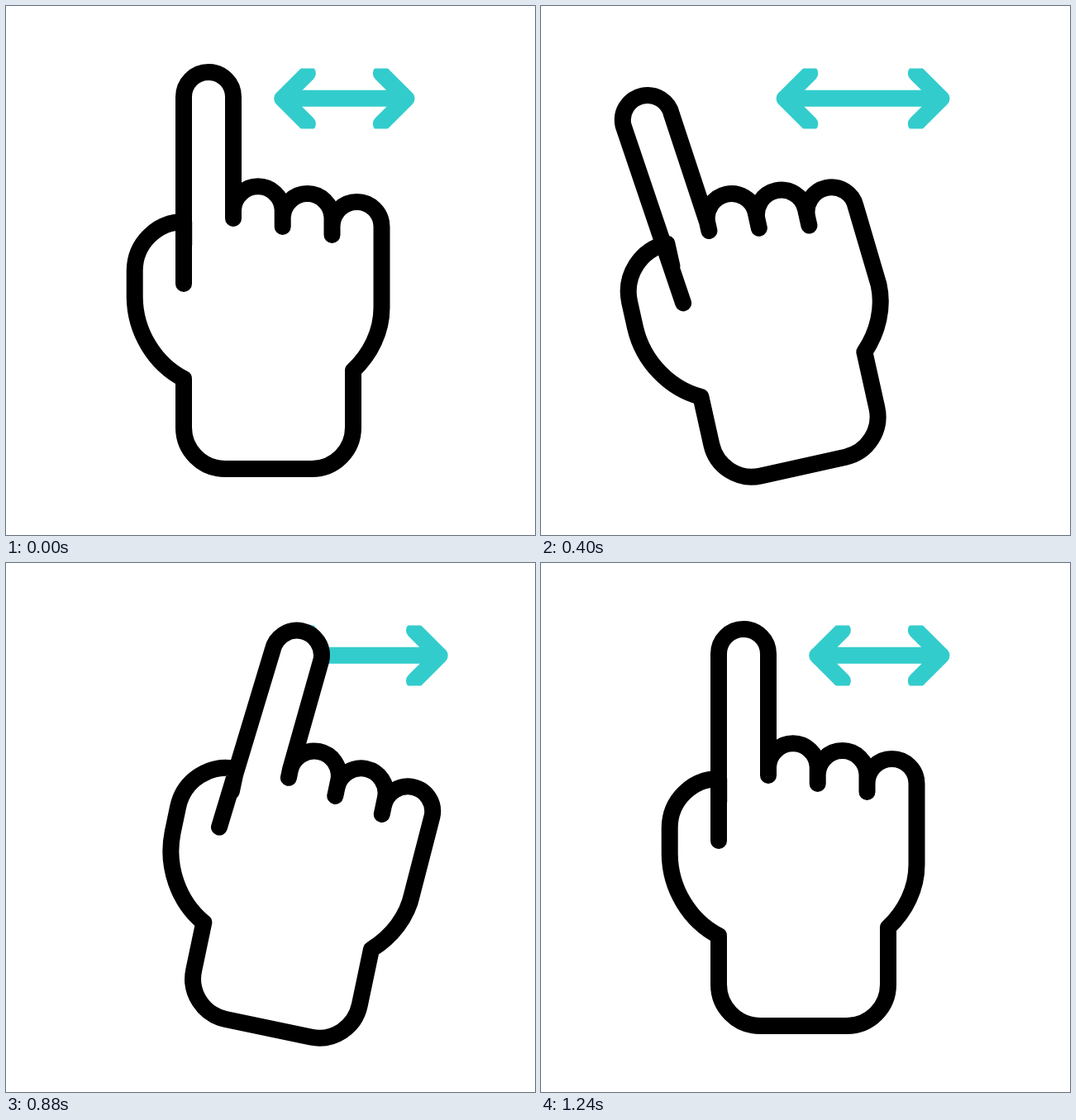
An HTML page that plays this animation: 640x640 px, repeating every 1.48 s.

```html
<!DOCTYPE html>
<html lang="en">
<head>
<meta charset="utf-8">
<title>Swipe gesture</title>
<style>
  html, body { margin: 0; width: 100%; height: 100%; overflow: hidden; background: #fff; }
  svg { display: block; width: 100%; height: 100%; }
  path { stroke-linecap: round; stroke-linejoin: round; }
</style>
</head>
<body>
<svg viewBox="0 0 640 640">
  <clipPath id="band"><rect x="0" y="75.5" width="640" height="73"/></clipPath>
  <path id="arrow" clip-path="url(#band)" fill="none" stroke="#33cccc" stroke-width="20"/>
  <path id="hand" fill="#fff" stroke="#000" stroke-width="20"/>
</svg>
<script>
const STEP = 40, LOOP = 1480;
const hand = document.getElementById('hand');
const arrow = document.getElementById('arrow');

// Each key: step, then values; smooth easing between keys.
// Pose: angle, then x/y offsets of fingertip, knuckles and finger base.
const poseKeys = [
  [2, 0, 0, 0, 0, 0, 0, 0],
  [11, -13, -21, 0, -6.8, 0, 4, -0.5],
  [20, 13, 15, 1.5, 4.8, 1.6, -6, -2],
  [31, 0, 0, 0, 0, 0, 0, 0]
];
const leftKeys = [[2, 0], [11, -41], [20, 0]];
const rightKeys = [[14, 0], [20, 44], [31, 0]];

function track(keys, n) {
  if (n <= keys[0][0]) return keys[0].slice(1);
  for (let i = 1; i < keys.length; i++) {
    const a = keys[i - 1], b = keys[i];
    if (n < b[0]) {
      const x = (n - a[0]) / (b[0] - a[0]);
      const e = x * x * (3 - 2 * x);
      return a.slice(1).map((v, j) => v + (b[j + 1] - v) * e);
    }
  }
  return keys[keys.length - 1].slice(1);
}

function handPath(tx, ty, kx, ky, ex, ey) {
  const tip = (x, y) => `${x + tx} ${y + ty}`;
  const kn = (x, y) => `${x + kx} ${y + ky}`;
  const arc = (r, end) => `A${r} ${r} 0 0 1 ${end}`;
  return [
    `M${215 + ex} ${336 + ey}`,
    `L${tip(215, 110)}`, arc(30, tip(275, 110)),
    `L${kn(275, 246.5)}L${kn(275, 257)}L${kn(275, 246.5)}`,
    arc(29.9, kn(334.7, 246.5)),
    `L${kn(334.7, 267)}L${kn(334.7, 257)}`,
    arc(29.9, kn(394.5, 257)),
    `L${kn(394.5, 277)}L${kn(394.5, 267)}`,
    arc(30, kn(454.5, 267)),
    'L454.5 365C454.5 394 441 421 420 441',
    'V510', arc(50, '370 560'), 'H265', arc(50, '215 510'), 'V451',
    'C180 433 156 394 155.7 352V320',
    arc(59.5, '215.2 261'), 'V289'
  ].join('');
}

function chevron(x, side) {
  const back = x + 30.7 * side;
  return `M${back} 81.5L${x} 112L${back} 142.5`;
}

function draw(time) {
  const n = Math.floor((time % LOOP) / STEP);
  const [angle, ...offsets] = track(poseKeys, n);
  hand.setAttribute('d', handPath(...offsets));
  hand.setAttribute('transform', `rotate(${angle} 304 560)`);
  const left = 334.2 + track(leftKeys, n)[0];
  const right = 484.5 + track(rightKeys, n)[0];
  arrow.setAttribute('d',
    chevron(left, 1) + chevron(right, -1) + `M${left} 111.8H${right}`);
}

let start = null;
function tick(now) {
  if (start === null) start = now;
  draw(Math.max(0, now - start));
  requestAnimationFrame(tick);
}
draw(0);
requestAnimationFrame(tick);
</script>
</body>
</html>
```
